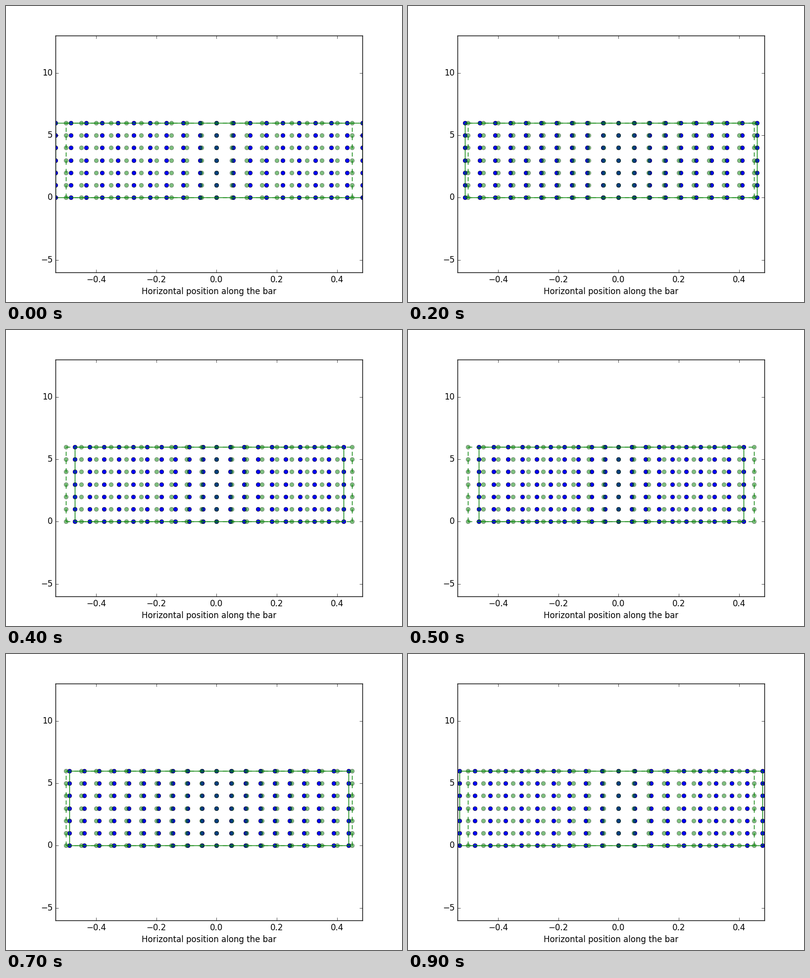
Write a matplotlib script that moves like this. It is 800x600 px and loops after 1000 ms.

```python
import numpy as np
import matplotlib.pyplot as plt
from matplotlib.animation import FuncAnimation

plt.style.use("classic")
plt.rcParams["font.family"] = "DejaVu Sans"

FRAMES = 10
AMPLITUDE = 0.035
HEIGHT = 6

rest_x, rest_y = np.meshgrid(np.arange(-10, 10) * 0.05, np.arange(HEIGHT + 1))


def displaced(x, phase):
    """Longitudinal standing wave with a node in the middle of the bar."""
    return x + AMPLITUDE * np.sin(np.pi * x) * np.cos(2 * np.pi * phase)


def edges(left, right):
    """Bottom, top, left and right sides of the bar."""
    return [
        ([left, right], [0, 0]),
        ([left, right], [HEIGHT, HEIGHT]),
        ([left, left], [0, HEIGHT]),
        ([right, right], [0, HEIGHT]),
    ]


fig = plt.figure(figsize=(8, 6), dpi=100, facecolor="white")
ax = fig.add_axes([0.125, 0.1, 0.775, 0.8])
stretched = displaced(rest_x, 0)
ax.set_xlim(stretched.min(), stretched.max())
ax.set_ylim(-6, 13)
ax.set_xticks([-0.4, -0.2, 0.0, 0.2, 0.4])
ax.set_yticks([-5, 0, 5, 10])
ax.set_xlabel("Horizontal position along the bar")

dots, = ax.plot(stretched.ravel(), rest_y.ravel(), "bo")
ax.plot(rest_x.ravel(), rest_y.ravel(), "go", alpha=0.5)
for xs, ys in edges(rest_x.min(), rest_x.max()):
    ax.plot(xs, ys, "g--")
sides = [ax.plot(xs, ys, "g-")[0]
         for xs, ys in edges(stretched.min(), stretched.max())]


def update(frame):
    x = displaced(rest_x, frame / FRAMES)
    dots.set_xdata(x.ravel())
    for side, (xs, ys) in zip(sides, edges(x.min(), x.max())):
        side.set_data(xs, ys)
    return [dots, *sides]


anim = FuncAnimation(fig, update, frames=FRAMES, interval=100, repeat=True,
                     repeat_delay=0, blit=False)
plt.show()
```
